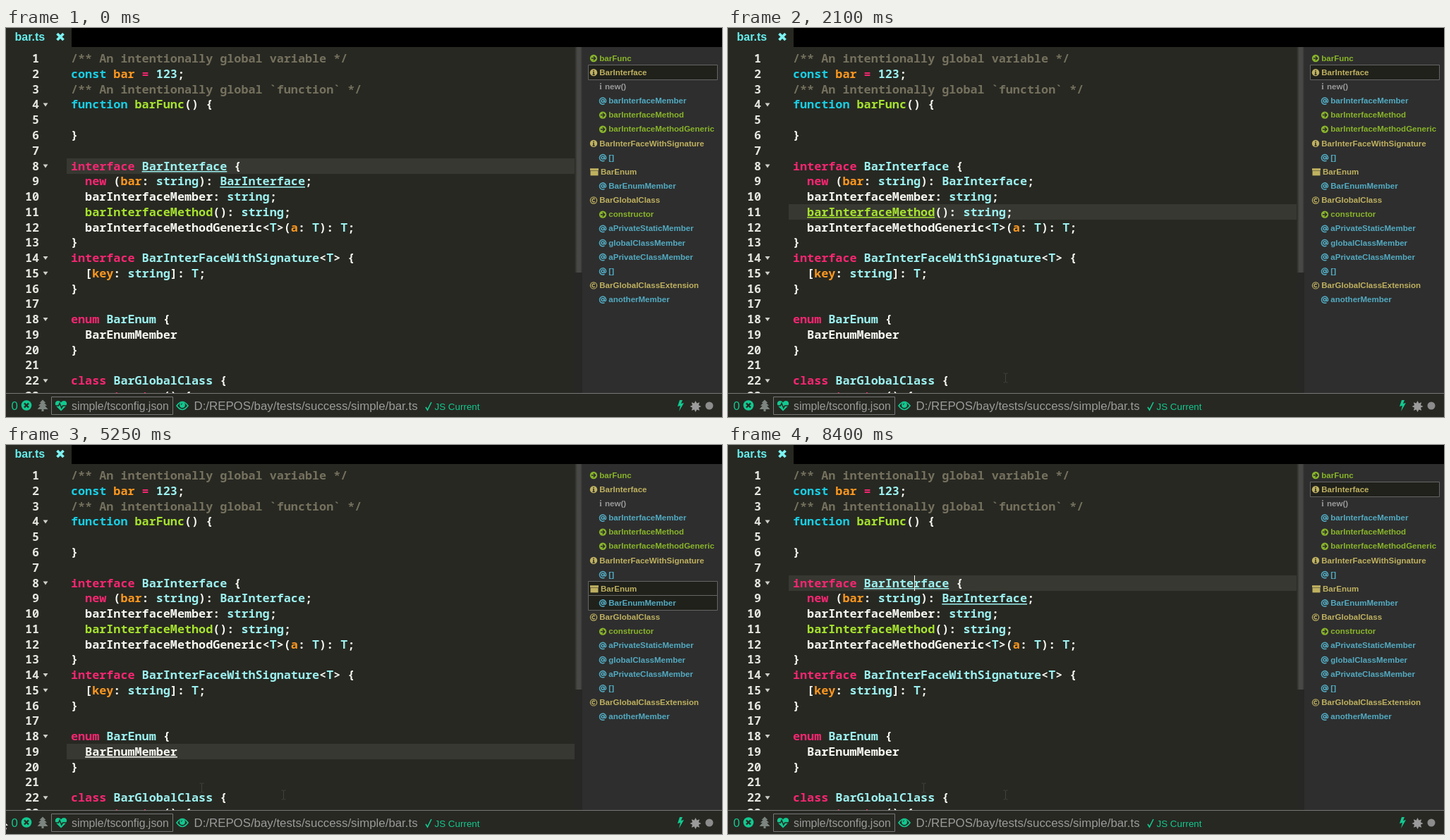
An HTML page with a canvas for the animation above (8.68 s loop, 1015 by 552 pixels).

```html
<!DOCTYPE html>
<html lang="en">
<head>
<meta charset="utf-8">
<title>Editor outline</title>
<style>
  html, body { margin: 0; width: 100%; height: 100%; overflow: hidden; background: #272822; }
  canvas { display: block; }
</style>
</head>
<body>
<canvas id="stage" width="1015" height="552"></canvas>
<script>
const ctx = document.getElementById('stage').getContext('2d');
const LOOP = 8680, STEP = 70;
const CODE_FONT = '600 16.77px "Noto Sans Mono", monospace';
const TIP_FONT = 'bold 17.2px "Noto Sans Mono", monospace';
const sans = (size, weight = '') => `${weight} ${size}px "Liberation Sans", sans-serif`;
const LEFT = 92, ADVANCE = 10.06, TOP = 32.2, LINE = 21.76;
const GREEN = '#12c990', GREY = '#9b9b9b', PANEL = '#2e2e2e', DARK = '#272822';

// "~x" switches to colour x
const INK = { w: '#f8f8f2', p: '#f92672', c: '#9cf1f0', b: '#18cfe6', o: '#fd971f', g: '#a6e22e', m: '#75715e' };
const CODE = [
  '~m/** An intentionally global variable */',
  '~bconst ~obar ~p= ~c123~w;',
  '~m/** An intentionally global `function` */',
  '~bfunction ~gbarFunc~w() {',
  '',
  '~w}',
  '',
  '~pinterface ~cBarInterface~w {',
  '~p  new ~w(~obar~w: ~cstring~w): ~cBarInterface~w;',
  '~w  barInterfaceMember: ~cstring~w;',
  '~g  barInterfaceMethod~w(): ~cstring~w;',
  '~w  barInterfaceMethodGeneric<~cT~w>(~oa~w: ~cT~w): ~cT~w;',
  '~w}',
  '~pinterface ~cBarInterFaceWithSignature~w<~cT~w> {',
  '~w  [~okey~w: ~cstring~w]: ~cT~w;',
  '~w}',
  '',
  '~penum ~cBarEnum~w {',
  '~w  BarEnumMember',
  '~w}',
  '',
  '~pclass ~cBarGlobalClass~w {',
  '~p  constructor~w() {'
];
const FOLDS = [4, 8, 14, 15, 18, 22];

const OUTLINE = [
  ['arrow', 0, 'barFunc'], ['info', 0, 'BarInterface'], ['letter', 1, 'new()'],
  ['at', 1, 'barInterfaceMember'], ['arrow', 1, 'barInterfaceMethod'],
  ['arrow', 1, 'barInterfaceMethodGeneric'], ['info', 0, 'BarInterFaceWithSignature'],
  ['at', 1, '[]'], ['box', 0, 'BarEnum'], ['at', 1, 'BarEnumMember'],
  ['ring', 0, 'BarGlobalClass'], ['arrow', 1, 'constructor'], ['at', 1, 'aPrivateStaticMember'],
  ['at', 1, 'globalClassMember'], ['at', 1, 'aPrivateClassMember'], ['at', 1, '[]'],
  ['ring', 0, 'BarGlobalClassExtension'], ['at', 1, 'anotherMember']
];
const OUTLINE_INK = { arrow: '#88b42a', info: '#bfb160', letter: '#999', at: '#52abc2', box: '#bfb160', ring: '#bfb160' };

// Click states: underlines are [line, column, length, ink]
const CLICKS = [
  { at: 0, line: 8, marks: [[8, 10, 12, 'c'], [9, 21, 12, 'c']] },
  { at: 1680, line: 11, caret: 203, marks: [[11, 2, 18, 'g']] },
  { at: 3850, line: 19, caret: 183, marks: [[19, 2, 13, 'w']] },
  { at: 6510, line: 8, caret: 264, marks: [[8, 10, 12, 'c'], [9, 21, 12, 'c']] }
];
const CARET_ON = [[1680, 2100], [2520, 3010], [3500, 4270], [4690, 5250], [5740, 6230], [6510, 6930], [7350, 7910], [8400, LOOP]];
const SELECTIONS = [[-500, [1]], [2520, [1, 4]], [4690, [8, 9]], [7350, [1]]];

const TIPS = [
  { on: 1190, off: 1960, from: [211, 230], to: [214, 224], text: '(method) BarInterface.barInterfaceMethodGeneric<T>(a: T): T' },
  { on: 3570, off: 3710, from: [189, 391], to: [189, 391], text: 'enum BarEnum' },
  { on: 3640, off: 4270, from: [188, 391], to: [185, 392], text: '(enum member) BarEnum.BarEnumMember = 0' },
  { on: 6160, off: 6790, from: [271, 152], to: [271, 152], text: 'interface BarInterface' }
];
const MOUSE = [
  [[770, 393, 496], [980, 240, 330], [1120, 201, 272], [1400, 201, 270], [1610, 203, 261], [1680, 203, 261], [1960, 101, 374]],
  [[3150, 277, 486], [3430, 251, 436], [3640, 177, 436], [3850, 177, 436], [3990, 49, 455], [4270, 23, 467]],
  [[5250, -6, 531], [5740, 326, 260], [6090, 261, 195], [6510, 261, 195], [6790, 606, 320]]
];
const TRAILS = [[840, LOOP, 393, 496], [3220, LOOP, 277, 486], [3500, 3850, 251, 436]];

const clamp = v => Math.max(0, Math.min(1, v));
const within = (t, [from, to]) => t >= from && t < to;
const lineTop = n => TOP + (n - 1) * LINE;

function rect(x, y, w, h, fill) {
  ctx.fillStyle = fill;
  ctx.fillRect(x, y, w, h);
}
function text(str, x, y, font, fill, align = 'left') {
  ctx.font = font;
  ctx.fillStyle = fill;
  ctx.textAlign = align;
  ctx.fillText(str, x, y);
}
function disc(x, y, r, fill) {
  ctx.fillStyle = fill;
  ctx.beginPath();
  ctx.arc(x, y, r, 0, 2 * Math.PI);
  ctx.fill();
}
function shape(d, x, y, fill) {
  ctx.save();
  ctx.translate(x, y);
  ctx.fillStyle = fill;
  ctx.fill(new Path2D(d));
  ctx.restore();
}
function line(d, x, y, stroke, width) {
  ctx.save();
  ctx.translate(x, y);
  ctx.strokeStyle = stroke;
  ctx.lineWidth = width;
  ctx.stroke(new Path2D(d));
  ctx.restore();
}

function drawEditor(state) {
  rect(0, 0, 1015, 552, DARK);
  rect(86, Math.round(lineTop(state.line)), 721, 22, '#373831');
  CODE.forEach((row, i) => {
    const top = lineTop(i + 1), base = Math.round(top + 17);
    text(i + 1, 47, base, CODE_FONT, '#e6e6e0', 'right');
    let x = LEFT;
    for (const part of row.split('~').slice(1)) {
      text(part.slice(1), x, base, CODE_FONT, INK[part[0]]);
      x += ctx.measureText(part.slice(1)).width;
    }
    if (FOLDS.includes(i + 1)) shape('M-3.5-2H3.5L0 3Z', 56, top + 11, '#d0d0ca');
  });
  for (const [n, column, length, ink] of state.marks)
    rect(LEFT + column * ADVANCE, Math.round(lineTop(n) + 18.6), length * ADVANCE, 1.5, INK[ink]);
}

function drawTabs() {
  rect(0, 0, 1015, 27, '#000');
  rect(0, 0, 93, 27, DARK);
  text('bar.ts', 12.5, 18, sans(16, 'bold'), '#66efee');
  line('M-4.5-4.5L4.5 4.5M4.5-4.5L-4.5 4.5', 77, 12.5, '#7df3f3', 3.8);
}

function drawIcon(kind, x, y, ink) {
  if (kind === 'letter') return text('i', x - 3, y + 4, 'bold 12px "Liberation Serif", serif', ink, 'center');
  if (kind === 'at') {
    line('M2.5 4A4.6 4.6 0 1 1 4.6 0C4.6 2.6 1.9 2.6 1.9 0V-2', x, y, ink, 1.5);
    return line('M1.9 0A1.9 1.9 0 1 1-1.9 0A1.9 1.9 0 1 1 1.9 0', x, y, ink, 1.5);
  }
  if (kind === 'box') {
    rect(x - 5, y - 5, 12, 3, ink);
    return rect(x - 4.5, y - 1.6, 11, 6.8, ink);
  }
  disc(x, y, 5.2, ink);
  if (kind === 'arrow') line('M-3.2 0H2.5M-.2-2.8L2.6 0L-.2 2.8', x, y, PANEL, 1.5);
  if (kind === 'info') line('M0-3.5V-2M-1-.5H0V3M-1.5 3H1.6', x, y, PANEL, 1.5);
  if (kind === 'ring') {
    disc(x, y, 4, PANEL);
    line('M1.8-1.4A2.2 2.2 0 1 0 1.8 1.4', x, y, ink, 1.4);
  }
}

function drawOutline(t) {
  const thumb = ctx.createLinearGradient(806, 0, 817, 0);
  thumb.addColorStop(0, DARK);
  thumb.addColorStop(.35, '#484846');
  thumb.addColorStop(.75, '#484846');
  thumb.addColorStop(1, PANEL);
  rect(806, 27, 11, 491, '#272725');
  rect(806, 27, 11, 320, thumb);
  rect(817, 27, 198, 491, PANEL);
  const active = SELECTIONS.findLastIndex(([at]) => t >= at);
  const mix = clamp((t - SELECTIONS[active][0] + STEP) / 280);
  const previous = active ? SELECTIONS[active - 1][1] : [];
  OUTLINE.forEach(([kind, level, label], i) => {
    const y = 42.6 + i * 20.15, ink = OUTLINE_INK[kind];
    ctx.globalAlpha = (SELECTIONS[active][1].includes(i) ? mix : 0) + (previous.includes(i) ? 1 - mix : 0);
    const boxTop = Math.round(y - 10.5) + .5;
    rect(825, boxTop, 183, 21, '#20211b');
    line('M0 0H183V21H0Z', 825.5, boxTop, '#656565', 1);
    ctx.globalAlpha = 1;
    drawIcon(kind, 833 + level * 13, y + .4, ink);
    const x = kind === 'letter' ? 849 : kind === 'box' ? 843 : 841.3 + level * 13;
    text(label, x, Math.round(y + 4), sans(11.52, 'bold'), ink);
  });
}

function drawStatus() {
  rect(0, 518, 1015, 34, DARK);
  rect(0, 518, 1015, 1, '#777');
  text('0', 7.5, 542, sans(16.8), GREEN);
  disc(29, 535.5, 7.3, GREEN);
  line('M-3-3L3 3M3-3L-3 3', 29, 535.5, DARK, 2.4);
  shape('M0-8.5L4.5-4H2.2L6 0H3.2L7.5 5H1.5V8H-1.5V5H-7.5L-3.2 0H-6L-2.2-4H-4.5Z', 52, 536, '#7c8580');
  line('M0 0H172V25H0Z', 64.5, 523.5, '#777', 1);
  shape('M0 7.5L-7 .5C-11-5-4-10 0-4.5C4-10 11-5 7 .5Z', 78, 536, GREEN);
  line('M-8 .5H-3.5L-2-3L.7 3.5L2.5 .5H8', 78, 535.5, DARK, 1.5);
  text('simple/tsconfig.json', 93, 542, sans(15.8), GREY);
  line('M-8 0Q0-11 8 0Q0 11-8 0Z', 250, 536, GREEN, 1.7);
  disc(250, 535, 3.9, GREEN);
  line('M-1.8-.2A2 2 0 0 1 0-2', 250, 535, DARK, 1);
  text('D:/REPOS/bay/tests/success/simple/bar.ts', 266.5, 542, sans(16.83), GREY);
  line('M-4 1L-1.5 5L4-6', 599, 537, GREEN, 1.6);
  text('JS Current', 607.5, 542, sans(13.4), GREEN);
  shape('M-1-8H3L1-3L5-4L-2 8L0 0L-4 1Z', 956, 536, GREEN);
  ctx.fillStyle = GREY;
  ctx.beginPath();
  for (let i = 0; i < 16; i++) {
    const r = i % 2 ? 4.8 : 8, a = i * Math.PI / 8 - Math.PI / 2;
    ctx.lineTo(977.5 + r * Math.cos(a), 537 + r * Math.sin(a));
  }
  ctx.fill();
  disc(997, 536, 5.5, '#8c8c8c');
}

function drawTip(tip, t) {
  const alpha = Math.min(clamp((t - tip.on + STEP) / 280), clamp((tip.off - t) / 280));
  if (t < tip.on || !alpha) return;
  const k = clamp((t - tip.on - STEP) / 350);
  const [x, y] = tip.from.map((v, i) => v + (tip.to[i] - v) * k);
  ctx.globalAlpha = alpha;
  ctx.font = TIP_FONT;
  ctx.beginPath();
  ctx.roundRect(x + 1.2, y + 1.2, ctx.measureText(tip.text).width + 19.5, 32, 4);
  ctx.fillStyle = '#333';
  ctx.fill();
  ctx.strokeStyle = '#f5f5f5';
  ctx.lineWidth = 2.4;
  ctx.stroke();
  text(tip.text, x + 11, y + 23, TIP_FONT, '#d2d2d2');
  ctx.globalAlpha = 1;
}

function drawBeam(x, y, ink) {
  line('M-3-6.5H-1L0-5.5L1-6.5H3M0-5.5V5.5M-3 6.5H-1L0 5.5L1 6.5H3', Math.round(x) + .5, Math.round(y) + .5, ink, 1);
}

function drawMouse(t) {
  for (const [from, to, x, y] of TRAILS) if (within(t, [from, to])) drawBeam(x, y, '#41423c');
  const path = MOUSE.find(p => t >= p[0][0] && t < p.at(-1)[0]);
  if (!path) return;
  const i = path.findLastIndex(p => t >= p[0]);
  const [t0, x0, y0] = path[i], [t1, x1, y1] = path[i + 1];
  const k = (t - t0) / (t1 - t0), x = x0 + (x1 - x0) * k, y = y0 + (y1 - y0) * k;
  if (y > 518) shape('M0 0L9 9H5L7 14L5 15L3 10L0 13Z', x, y, '#f2f2f2');
  else drawBeam(x, y, '#62635c');
}

function draw(t) {
  const state = CLICKS.findLast(c => t >= c.at);
  drawEditor(state);
  drawTabs();
  drawOutline(t);
  drawStatus();
  if (CARET_ON.some(span => within(t, span))) rect(state.caret, Math.round(lineTop(state.line)), 1, 22, '#f8f8f0');
  TIPS.forEach(tip => drawTip(tip, t));
  drawMouse(t);
}

const start = performance.now();
function tick() {
  const t = (performance.now() - start) % LOOP;
  draw(Math.floor(t / STEP) * STEP);
  requestAnimationFrame(tick);
}
tick();
</script>
</body>
</html>
```
